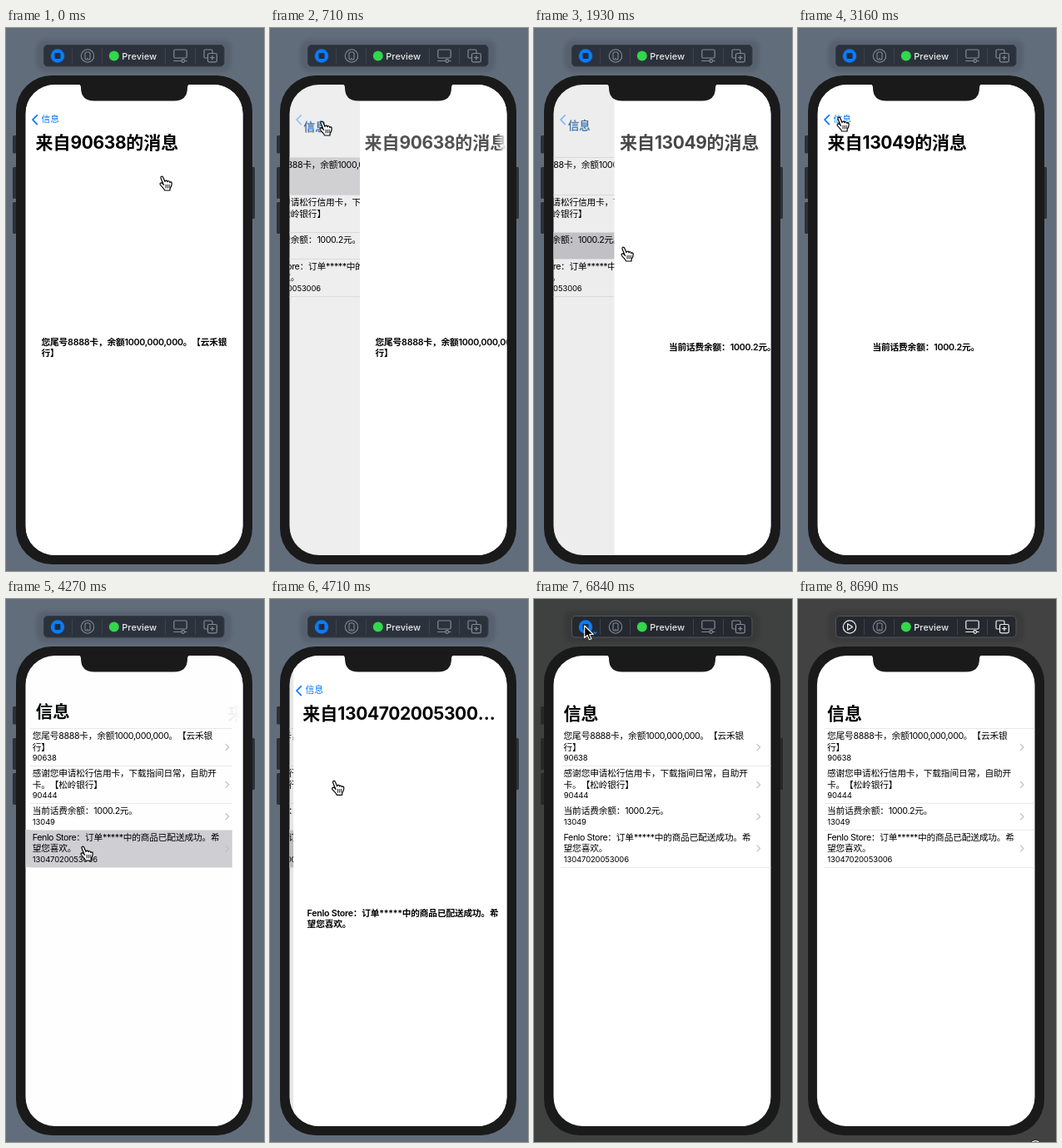
Animation of 310x652 px, one loop 8790 ms. Source, as an HTML page:

```html
<!DOCTYPE html>
<html lang="zh-CN">
<head>
<meta charset="utf-8">
<title>Preview</title>
<style>
html, body { margin: 0; width: 100%; height: 100%; overflow: hidden; }
body {
  position: relative;
  background: #626d7c;
  font-family: Inter, "Noto Sans CJK SC", "Noto Sans CJK", sans-serif;
  text-spacing-trim: space-all;
}
svg, .layer { position: absolute; left: 0; top: 0; width: 310px; height: 652px; }
#halo { filter: blur(2px); }
#screen { --left: 23.5px; background: #fff; clip-path: inset(68px 25.5px 19px var(--left) round 35px); }
.t {
  position: absolute; white-space: nowrap; color: #000;
  font-size: 10.72px; line-height: 14px; margin-top: -7px; letter-spacing: -.19px;
}
.n { letter-spacing: -.42px; }
.sub, .sub .n { font-size: 9.5px; letter-spacing: -.15px; }
.body { font-weight: 600; }
.body .n { letter-spacing: -.3px; }
.title { font-size: 21px; line-height: 28px; margin-top: -14px; font-weight: 700; letter-spacing: 0; }
.title .n { letter-spacing: -.4px; }
.heading { width: 237px; overflow: hidden; text-overflow: ellipsis; }
.morph { left: 0; top: 0; transform-origin: 0 50%; }
#small { color: #007aff; }
#heads { -webkit-mask-image: linear-gradient(90deg, #000 272px, transparent 284px); mask-image: linear-gradient(90deg, #000 272px, transparent 284px); }
.fill { position: absolute; left: 23.5px; width: 261.5px; }
.row { background: #d0d0d4; opacity: 0; }
.sep { height: 1px; left: 33px; width: 252px; background: #e9e9eb; }
#dim { background: #000; }
#panel { top: 68px; height: 565px; background: #fff; }
</style>
</head>
<body>
<svg viewBox="0 0 310 652">
  <rect id="halo" x="36" y="14" width="235" height="39" rx="11" opacity=".1"/>
  <g id="keys">
    <rect x="8" y="129" width="6" height="21.5" rx="1.5"/>
    <rect x="8" y="167" width="6" height="38" rx="1.5"/>
    <rect x="8" y="209" width="6" height="38" rx="1.5"/>
    <rect x="293" y="167" width="6" height="62" rx="1.5"/>
  </g>
  <rect x="12" y="57" width="284" height="587" rx="43" fill="#1a1a1a"/>
  <rect id="bar" x="45.5" y="20.5" width="216.5" height="25.5" rx="4.5"/>
  <path d="M79.5 24v19M115.5 24v19M191.5 24v19M227.5 24v19" stroke="#3c434d"/>
  <g id="stop">
    <circle cx="62" cy="33.5" r="8.2" fill="#0a7cf8"/>
    <rect x="58.5" y="30" width="7" height="7" rx="1.3" fill="#1c2c44"/>
    <path id="menu" d="M71.5 39.5l2 2 2-2" fill="none" stroke="#0a7cf8" stroke-width="1.3"/>
  </g>
  <g id="play" fill="none" stroke="#f2f2f2" stroke-width="1.2" stroke-linejoin="round">
    <circle cx="62" cy="33.5" r="7.7"/>
    <path d="M59.6 29.8v7.4l6-3.7z"/>
  </g>
  <g fill="none" stroke="#858b94" stroke-width="1.1">
    <circle cx="98" cy="33.5" r="7.7"/>
    <rect x="95" y="29" width="6" height="9" rx="1.3"/>
    <path d="M97 36.5h2" stroke-width=".8"/>
  </g>
  <circle cx="129.8" cy="33.5" r="6" fill="#32d74b"/>
  <text x="139.3" y="37.5" font-size="11" font-weight="500" fill="#e6e8eb">Preview</text>
  <g id="tools" fill="none" stroke-width="1.2">
    <rect x="201.8" y="26" width="15.4" height="10" rx="1.5"/>
    <path d="M201.3 39.5h9.500M214.7 39.5h2.800"/>
    <circle cx="212.7" cy="39.5" r="1.8"/>
    <path d="M242 36h-2.500q-1.500 0-1.500-1.500v-7q0-1.500 1.500-1.500h7q1.500 0 1.500 1.500V30"/>
    <rect x="242.5" y="30.5" width="10.8" height="10.3" rx="1.5"/>
    <path d="M245.3 35.600h5.200M247.900 33v5.200"/>
  </g>
</svg>

<div id="screen" class="layer">
  <div id="list" class="layer"></div>
  <div id="dim" class="layer"></div>
  <div id="detail" class="layer"><div id="panel" class="fill"></div></div>
  <div id="heads" class="layer"></div>
  <svg id="back" viewBox="0 0 310 652"><path d="M37.3 104.8l-5.300 5.400 5.300 5.400" fill="none" stroke="#007aff" stroke-width="1.7" stroke-linecap="round" stroke-linejoin="round"/></svg>
  <div id="small" class="t morph">信息</div>
  <div id="large" class="t title morph">信息</div>
</div>

<svg viewBox="0 0 310 652">
  <path d="M86 67.5q4 0 4 4q0 16 16 16h96q16 0 16-16q0-4 4-4z" fill="#1a1a1a"/>
  <g id="cursor">
    <g id="hand" stroke="#000" stroke-linejoin="round" stroke-linecap="round">
      <path d="M5 10.5L2.3 4C1 1 4 .2 5 2.8L7 7.6C7 5.6 10 5.6 10 7.8C10.3 6.2 12.6 6.4 12.8 8.4C13.4 7.4 15.2 7.6 15.2 9.6C15.3 12.5 14.5 13.8 13.2 15.5L13 18H6.6C6.4 16 3.4 14.2 1.2 11C.5 9.2 2.6 8.2 4 9.6L5.6 11.4" fill="#fff" stroke-width="1.2"/>
      <path d="M8 11.2v3.8M10.1 11.2v3.8M12.2 11.2v3.6" fill="none" stroke-width=".9"/>
    </g>
    <path id="arrow" d="M0 0V14.5L3.4 11.4L5.8 16.8L8.2 15.8L5.9 10.5H10.6Z" fill="#000" stroke="#fff" stroke-width="1.1" stroke-linejoin="round"/>
    <g id="ring">
      <circle r="7.8" fill="#111"/>
      <circle r="6.3" fill="#222" stroke="#fff" stroke-width="1.3"/>
    </g>
  </g>
</svg>

<script>
const LOOP = 8790, WIDTH = 261;
const $ = id => document.getElementById(id);
const clamp = v => Math.max(0, Math.min(1, v));
const lerp = (a, b, k) => a + (b - a) * k;
const mix = (a, b, k) => `rgb(${a.map((v, i) => Math.round(lerp(v, b[i], k)))})`;
const show = (id, on) => { $(id).style.display = on ? '' : 'none'; };

const messages = [
  { from: '90638', x: 42.5, text: ['您尾号8888卡，余额1000,000,000。【云禾银', '行】'] },
  { from: '90444', x: 42.5, text: ['感谢您申请松行信用卡，下载指间日常，自助开', '卡。【松岭银行】'] },
  { from: '13049', x: 89.5, text: ['当前话费余额：1000.2元。'] },
  { from: '13047020053006', x: 40.5, text: ['Fenlo Store：订单*****中的商品已配送成功。希', '望您喜欢。'] }
];

// Navigation: time, 1 = open / 0 = close, message index
const moves = [[-2000, 1, 0], [615, 0, 0], [1740, 1, 2], [3425, 0, 2], [4238, 1, 3], [5332, 0, 3]];

// Pointer path: time, x, y
const path = [
  [0, 184, 177], [264, 59, 111], [880, 59, 111], [1320, 111, 276], [1500, 111, 276],
  [1584, 104, 262], [2000, 104, 262], [2464, 40, 84], [2730, 40, 84], [2816, 43, 84],
  [2904, 45, 84], [3080, 45, 84], [3168, 46, 106], [3620, 46, 106], [4000, 88, 290],
  [4088, 88, 290], [4177, 89, 296], [4500, 89, 296], [4973, 54, 117], [5062, 52, 111],
  [5700, 52, 111], [6124, 59, 38], [6212, 60, 36], [6300, 60.7, 32], [7200, 60.7, 32],
  [7982, 286, 648], [8160, 286, 648], [8248, 286, 645], [8336, 287, 646], [8602, 287, 646],
  [8690, 285.5, 657], [8790, 285.5, 657]
];

const label = (x, y, text, cls) =>
  `<div class="t ${cls}" style="left:${x}px;top:${y}px">` +
  text.replace(/[\x20-\x7e]+/g, '<span class="n">$&</span>') + '</div>';

function build() {
  let y = 155.5, backs = '', texts = '', seps = '', arrows = '', bodies = '', heads = '';
  const sep = top => `<div class="fill sep" style="top:${top - .5}px"></div>`;
  seps += sep(y);
  messages.forEach((m, i) => {
    const n = m.text.length, h = 18 + 13.5 * n, mid = y + h / 2;
    backs += `<div class="fill row" style="top:${y}px;height:${h}px"></div>`;
    m.text.forEach((s, k) => {
      texts += label(35.6, y + 9.7 + 13.4 * k, s, '');
    });
    texts += label(35.8, y + 9 + 13.4 * n, m.from, 'sub');
    arrows += `M268 ${mid - 3.7}l3.6 3.7-3.6 3.7`;
    bodies += `<div class="layer body-${i}">` + m.text.map((s, k) =>
      label(m.x, (n > 1 ? 377.5 : 384) + 13.4 * k, s, 'body')).join('') + '</div>';
    heads += `<div class="layer head-${i}">` +
      label(35.5, 138, '来自' + m.from + '的消息', 'title heading') + '</div>';
    y += h;
    seps += sep(y);
  });
  $('list').innerHTML = backs + seps + texts +
    `<svg viewBox="0 0 310 652"><path d="${arrows}" fill="none" stroke="#c2c2c5" stroke-width="1.2" stroke-linecap="round" stroke-linejoin="round"/></svg>`;
  $('detail').insertAdjacentHTML('beforeend', bodies);
  $('heads').innerHTML = heads;
}
build();

const rows = [...document.querySelectorAll('.row')];
const seps = [...document.querySelectorAll('.sep')];
const bodies = messages.map((m, i) => document.querySelector('.body-' + i));
const heads = messages.map((m, i) => document.querySelector('.head-' + i));

function tick(t) {
  const [a, d] = t < 3425 ? [0, 88] : t < 3995 ? [3430, 95] : [4000, 88.5];
  return a + Math.floor((t - a + 13) / d) * d;
}

function spring(ms) {
  const s = Math.max(0, ms) * .013;
  return s > 8 ? 1 : 1 - (1 + s) * Math.exp(-s);
}

function nav(t) {
  const tap = 75;
  let cur = moves[0];
  for (const m of moves) if (t >= m[0] - (m[1] ? tap : 0)) cur = m;
  const k = spring(t - cur[0]);
  const open = cur[1] ? k : 1 - k;
  return { open, id: cur[2], lit: cur[1] ? 1 : open };
}

function point(t) {
  let i = 1;
  while (i < path.length - 1 && t > path[i][0]) i++;
  const a = path[i - 1], b = path[i], k = clamp((t - a[0]) / (b[0] - a[0]));
  return [lerp(a[1], b[1], k), lerp(a[2], b[2], k)];
}

function drawScreen(t, paused) {
  const { open, id, lit } = nav(t), shut = 1 - open;
  const still = open < .005 && lit < .005, nudge = paused ? .6 : 0;
  $('screen').style.setProperty('--left', 23.5 - nudge + 'px');
  show('list', shut > .005);
  show('dim', shut > .005);
  $('list').style.transform = `translateX(${-78 * open - nudge}px)`;
  $('dim').style.opacity = .1 * open;
  $('detail').style.transform = `translateX(${WIDTH * shut}px)`;
  $('heads').style.opacity = open;
  $('back').style.opacity = clamp(open * 2 - 1);
  rows.forEach((r, i) => { r.style.opacity = i === id ? lit : 0; });
  seps.forEach((s, i) => {
    const seen = paused ? i !== 1 : !still || i === 1 || i === 4;
    s.style.opacity = seen ? 1 : 0;
  });
  messages.forEach((m, i) => {
    bodies[i].style.display = heads[i].style.display = i === id ? '' : 'none';
    heads[i].style.transform = `translateX(${WIDTH * .93 * shut}px)`;
  });
  const size = lerp(10.72, 21, shut);
  const x = lerp(42.6, 35.5, shut) - nudge, y = lerp(110, 138, shut);
  for (const [name, base, alpha] of [['small', 10.72, open], ['large', 21, shut]]) {
    $(name).style.transform = `translate(${x}px,${y}px) scale(${size / base})`;
    $(name).style.opacity = alpha;
  }
}

function drawShell(t, paused) {
  const d = clamp((t - 6390) / 442);
  document.body.style.background = paused ? '#424242' : mix([98, 109, 124], [63, 64, 64], d);
  $('bar').setAttribute('fill', mix([44, 50, 60], [37, 41, 47], d));
  $('bar').setAttribute('stroke', mix([53, 60, 70], [82, 85, 89], d));
  $('keys').setAttribute('fill', mix([44, 48, 55], [40, 40, 40], d));
  $('tools').setAttribute('stroke', paused ? '#f0f0f0' : '#858b94');
  show('keys', !paused);
  show('stop', !paused);
  show('play', paused);
  show('menu', t >= 6290);
}

function drawCursor(t) {
  const [x, y] = point(t);
  const kind = t < 6290 ? 'hand' : t < 8680 ? 'arrow' : 'ring';
  for (const k of ['hand', 'arrow', 'ring']) show(k, k === kind);
  $('cursor').setAttribute('transform', `translate(${x} ${y})`);
}

const begin = performance.now();
function frame() {
  const t = tick((performance.now() - begin) % LOOP);
  const paused = t >= 7270;
  drawShell(t, paused);
  drawScreen(t, paused);
  drawCursor(t);
  requestAnimationFrame(frame);
}
frame();
</script>
</body>
</html>
```
